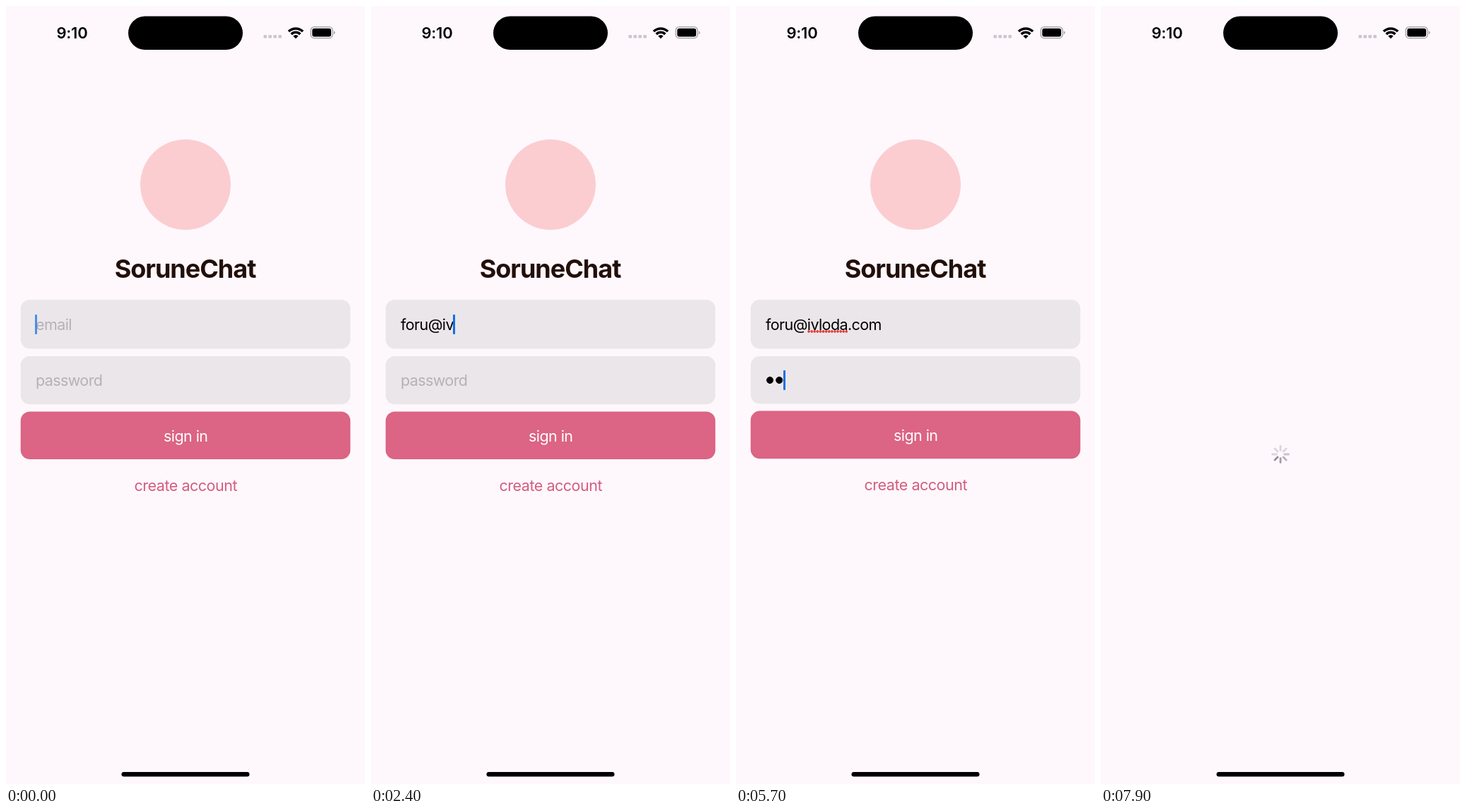
Recreate the animation shown at these times as an HTML page. Size 508 by 1102 pixels, loop 8 s.

```html
<!DOCTYPE html>
<html lang="en">
<head>
<meta charset="utf-8">
<title>Sign in</title>
<style>
  html, body { margin: 0; width: 508px; height: 1102px; overflow: hidden; background: #fef8fd; }
  body {
    position: relative;
    font: 21.5px/26px Inter, "Liberation Sans", sans-serif;
    letter-spacing: -.55px;
    white-space: nowrap;
  }
  svg { position: absolute; left: 0; top: 0; }
  #form > * { position: absolute; }
  #logo { left: 190px; top: 189px; width: 128px; height: 128px; border-radius: 50%; background: #fbcdd1; }
  h1 {
    left: 0; top: 350px; width: 507px; margin: 0;
    font-size: 36px; line-height: 44px; font-weight: 700; letter-spacing: -1px;
    text-align: center; color: #230f0a;
  }
  .field { display: flex; align-items: center; left: 21px; padding-left: 21px; letter-spacing: -.6px; color: #000; }
  #email { top: 416px; height: 69.5px; }
  #password { top: 496px; height: 68px; }
  .hint { position: absolute; color: #b7b1b6; }
  .caret { width: 2.7px; height: 28px; margin-left: -1px; border-radius: 1px; background: #0f70e6; z-index: 1; }
  #domain { position: relative; }
  .checked::after {
    content: ""; position: absolute; left: 0; right: 0; top: 21px; height: 4px;
    background: radial-gradient(circle, #e33a36 1.5px, transparent 2px) 0 0 / 4.1px 4px repeat-x;
  }
  #dots { height: 10px; background: radial-gradient(circle at 6px 5px, #000 4.6px, transparent 5.2px) 0 0 / 13.2px 10px; }
  #button, #link { left: 0; width: 508.5px; text-align: center; }
  #button { top: 596px; color: #fff; }
  #link { top: 666px; letter-spacing: -.49px; color: #d35c7e; }
  .filled #password { height: 67.5px; }
  .filled #button, .filled #link { margin-top: -1px; }
  .filled #plate { transform: translateY(-.9px); }
  .filled #passwordBox { height: 67.5px; }
</style>
</head>
<body>
<div id="form">
  <svg width="508" height="1102" fill="#ebe6ea">
    <rect x="20.7" y="416" width="466.6" height="69.6" rx="13"/>
    <rect id="passwordBox" x="20.7" y="496" width="466.6" height="68.2" rx="13"/>
    <rect id="plate" x="20.7" y="574.5" width="466.6" height="67.6" rx="13" fill="#dc6484"/>
  </svg>
  <div id="logo"></div>
  <h1>SoruneChat</h1>
  <div id="email" class="field">
    <span class="hint">email</span>
    <span id="user"></span><span id="domain"></span><span id="tld"></span><i class="caret"></i>
  </div>
  <div id="password" class="field">
    <span class="hint">password</span>
    <span id="dots"></span><i class="caret"></i>
  </div>
  <div id="button">sign in</div>
  <div id="link">create account</div>
</div>

<svg width="508" height="1102">
  <rect x="173" y="14.5" width="162" height="47.5" rx="23.75"/>
  <text x="71.4" y="46" font-size="22" font-weight="600" letter-spacing="-.2">9:10</text>
  <g fill="#cbc6cb">
    <rect x="364.5" y="41" width="4.6" height="4.6" rx="1.3"/>
    <rect x="371.4" y="41" width="4.6" height="4.6" rx="1.3"/>
    <rect x="378.4" y="41" width="4.6" height="4.6" rx="1.3"/>
    <rect x="385.4" y="41" width="4.6" height="4.6" rx="1.3"/>
  </g>
  <g transform="translate(410 46.2)">
    <g fill="none" stroke="#000" stroke-width="3.5">
      <path d="M-10.1-10.1a14.3 14.3 0 0 1 20.2 0"/>
      <path d="M-6.3-6.3a8.9 8.9 0 0 1 12.6 0"/>
    </g>
    <path d="M0 0L-3.7-3.7a5.2 5.2 0 0 1 7.4 0z"/>
  </g>
  <rect x="431.2" y="29.6" width="31" height="16" rx="5" fill="none" stroke="#a29ea2" stroke-width="1.3"/>
  <rect x="433.3" y="31.8" width="26.8" height="11.6" rx="3"/>
  <path d="M463.8 35.2a2.6 2.6 0 0 1 0 5z" fill="#a29ea2"/>
  <rect x="163.5" y="1085" width="181" height="6.4" rx="3.2"/>
  <g id="spinner" transform="translate(254 635)" fill="#3c3c44"></g>
</svg>

<script>
const LOOP = 8000, STEP = 100, CHECKED = 3700, FOCUS_PASSWORD = 4700, LOAD = 7200;
const SPIN_START = 7130, TICK = 125;
const USER = 'foru@', DOMAIN = 'ivloda', TLD = '.com';
const emailKeys = [700, 1100, 1700, 1700, 2000, 2200, 2400, 2500, 2700, 2800, 2900, 3100, 3200, 3400, 3500];
const passwordKeys = [5300, 5700, 5900, 6000, 6100, 6200, 6400, 6600];
// Every keystroke or focus change restarts the caret's blink
const blinkStarts = [-540, ...emailKeys, FOCUS_PASSWORD, ...passwordKeys];

const $ = id => document.getElementById(id);
const form = $('form'), spinner = $('spinner');
const [emailHint, passwordHint] = document.querySelectorAll('.hint');
const [emailCaret, passwordCaret] = document.querySelectorAll('.caret');
const countTyped = (keys, t) => keys.filter(k => k <= t).length;
const show = (el, on) => { el.style.visibility = on ? 'visible' : 'hidden'; };

for (let i = 0; i < 8; i++) {
  spinner.insertAdjacentHTML('beforeend',
    `<rect x="-1.4" y="-12.9" width="2.8" height="8.6" rx="1.4" transform="rotate(${i * 45})"/>`);
}

// Solid for 500 ms, out over 150, hidden for 200, in over 150
function caretAlpha(t) {
  const start = blinkStarts.filter(s => s <= t).pop();
  const fade = (Math.abs((t - start) % 1000 - 750) - 100) / 150;
  return Math.min(1, Math.max(0, fade));
}

function drawForm(t) {
  const n = countTyped(emailKeys, t), dots = countTyped(passwordKeys, t);
  const onPassword = t >= FOCUS_PASSWORD;
  const alpha = caretAlpha(t);

  $('user').textContent = USER.slice(0, n);
  $('domain').textContent = DOMAIN.slice(0, Math.max(0, n - USER.length));
  $('tld').textContent = TLD.slice(0, Math.max(0, n - USER.length - DOMAIN.length));
  $('domain').className = t >= CHECKED ? 'checked' : '';
  $('dots').style.width = dots * 13.2 + 'px';
  emailHint.style.opacity = n ? 0 : 1;
  passwordHint.style.opacity = dots ? 0 : 1;
  emailCaret.style.opacity = onPassword ? 0 : alpha;
  passwordCaret.style.opacity = onPassword ? alpha : 0;
  form.className = dots ? 'filled' : '';
}

function drawSpinner(t) {
  const head = Math.floor((t - SPIN_START) / TICK) + 7;
  [...spinner.children].forEach((spoke, i) => {
    const age = (head - i) % 8;
    spoke.setAttribute('fill-opacity', Math.max(.184, .576 - age * .098));
  });
}

function frame() {
  const t = Math.floor(performance.now() % LOOP / STEP) * STEP;
  const loading = t >= LOAD;
  show(form, !loading);
  show(spinner, loading);
  loading ? drawSpinner(t) : drawForm(t);
  requestAnimationFrame(frame);
}
frame();
</script>
</body>
</html>
```
